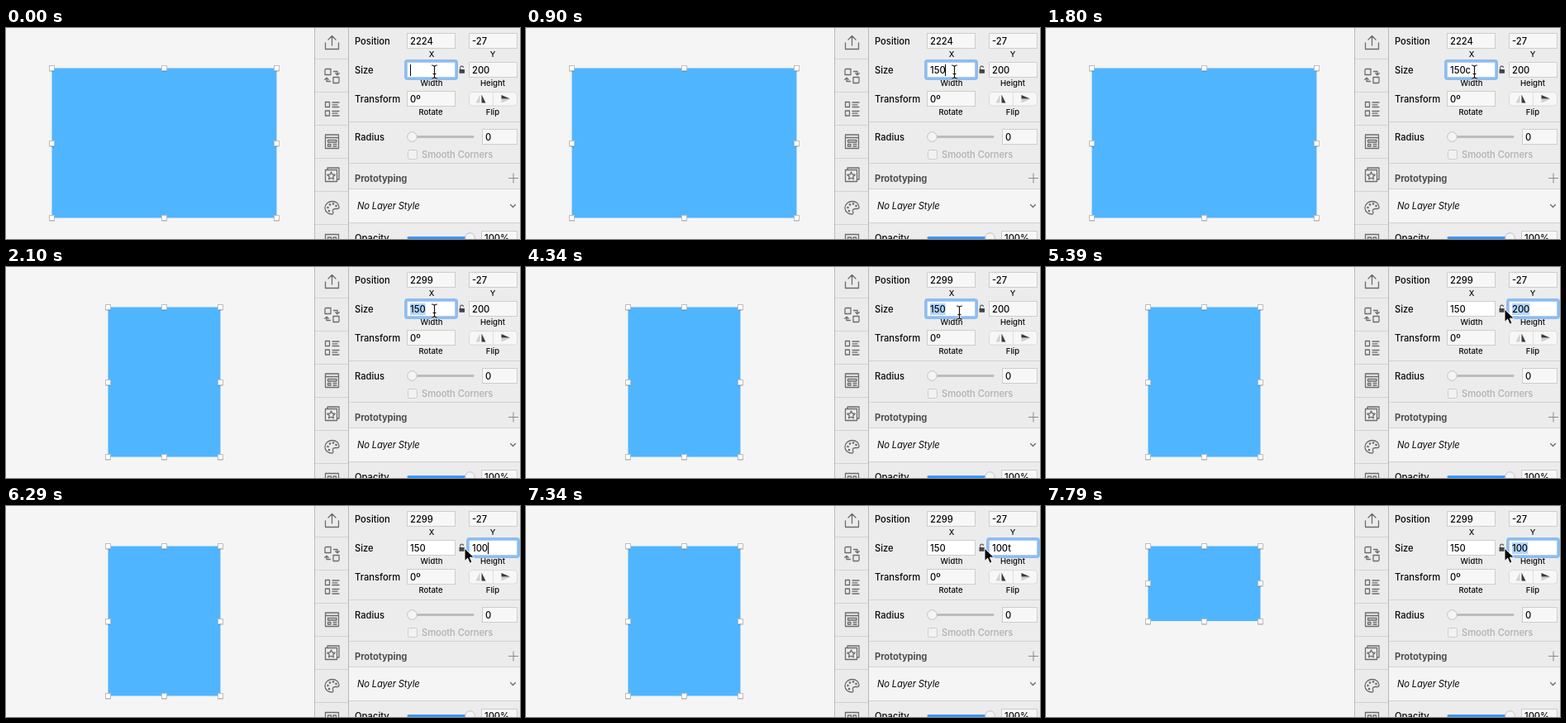
An HTML page for the animation above (8000 ms loop, 622 px wide and 255 px high).

```html
<!DOCTYPE html>
<html lang="en">
<head>
<meta charset="utf-8">
<title>Resizing a layer</title>
<style>
  html, body { margin: 0; width: 100%; height: 100%; overflow: hidden; background: #f5f5f5; }
  svg { display: block; width: 622px; height: 255px; }
  text { font: 450 11.2px Inter, "Open Sans", sans-serif; fill: #080808; white-space: pre; }
  .cap { font-size: 9.5px; text-anchor: middle; }
  .field { fill: #f7f7f7; stroke: #cdcdcd; }
  .icon { fill: none; stroke: #6c6c6c; stroke-width: 1.3; stroke-linejoin: round; stroke-linecap: round; }
  .rule { stroke: #d2d2d2; }
</style>
</head>
<body>
<svg viewBox="0 0 622 255">
  <rect width="622" height="255" fill="#f5f5f5"/>
  <rect id="layer" fill="#50b5ff"/>
  <g id="handles"></g>

  <!-- tool strip -->
  <rect x="373" width="42" height="255" fill="#ebebeb"/>
  <path stroke="#b9b9b9" d="M373.5 0V255M414.5 0V255"/>
  <path class="rule" d="M374 37.5h40M374 77.5h40M374 117.5h40M374 157.5h40M374 197.5h40M374 237.5h40"/>
  <g class="icon">
    <path d="M386.500 18v7.500h16v-7.500M394.500 21V10M390 14l4.500-4.500 4.500 4.500"/>
    <path d="M387 49.500h6v7h-7v-6zM396 59.500h7v6l-1 1h-6zM396.500 52.500h4.500v4M398.800 54.800l2.200 2 2.200-2M392.500 64.500h-4.500v-4M385.800 62.200l2.200-2 2.200 2"/>
    <path d="M386.500 89.500h5v6h-5zM386.500 100h5v6h-5zM395 90h8M395 92.800h6M395 95.500h8M395 100.500h8M395 103.200h6M395 106h8"/>
    <path d="M386.500 129h16v16.500h-16zM386.500 132.500h16M389.500 135.500h10.500v2.500h-10.500zM389.500 140.500h3.500v2.500h-3.500zM396 140.500h4M396 143h4"/>
    <path d="M386.500 171.500h14v14h-14zM389 171v-2h14v14h-2M393.500 174l1.400 3 3.300.4-2.400 2.200.6 3.200-2.900-1.600-2.900 1.600.6-3.200-2.400-2.200 3.300-.4z"/>
    <path d="M395 209.500c-5 0-9 3.500-9 8 0 4 3.500 7.500 8 7.500 2.500 0 2-2 1.500-3.500-.5-2 1-3 3-3h2.500c1.500 0 2-1 2-2 0-4-3.500-7-8-7z"/>
    <path d="M386.500 265v-15.500h16V265M389.500 265v-12h4v12M396 265v-12h3.500v12"/>
  </g>
  <g fill="#6c6c6c"><circle cx="389.500" cy="217" r="1.300"/><circle cx="392" cy="213.500" r="1.300"/><circle cx="396" cy="212.500" r="1.300"/><circle cx="399.500" cy="215" r="1.300"/><circle cx="391" cy="221" r="1.300"/></g>

  <!-- inspector -->
  <rect x="415" width="207" height="255" fill="#ececec"/>
  <rect x="415" y="195" width="207" height="40" fill="#f5f5f5"/>
  <path class="rule" d="M415 113.500h207M415 163.500h207M415 194.500h207M415 235.500h207"/>
  <g id="fields"></g>
  <g id="labels"></g>

  <rect x="560.500" y="77.500" width="58" height="16.500" rx="3.500" fill="#f7f7f7" stroke="#dadada"/>
  <path stroke="#dedede" d="M589.500 78v15.500"/>
  <path fill="#d0d0d0" d="M573.500 80.500v10h-5zM599.500 86h10.500l-10.500 4.500z"/>
  <path fill="#3a3a3a" d="M575.500 80.500v10h5zM599.500 85.500h10.500l-10.500-4.500z"/>

  <g stroke-linecap="round" stroke-width="3">
    <path stroke="#bcbcbc" d="M492 131.500h73"/>
    <path stroke="#3b97fa" d="M487 253.500h74"/>
  </g>
  <g fill="#f4f4f4" stroke="#c2c2c2"><circle cx="491.500" cy="131.500" r="5.800"/><circle cx="561.500" cy="253.500" r="5.800"/></g>
  <rect x="486.500" y="147.500" width="11" height="11" rx="2" fill="#f2f2f2" stroke="#cbcbcb"/>
  <path stroke="#8a8a8a" d="M608 181.500h12M614 175.500v12"/>
  <path class="icon" d="M610.500 213.500l3 3 3-3"/>
  <path fill="none" stroke="#555" stroke-width="1.100" d="M549.700 50.500v-2.500a1.900 1.900 0 0 1 3.800 0"/>
  <rect x="548.500" y="50" width="6.500" height="4.800" rx=".6" fill="#444"/>

  <!-- focused input -->
  <rect id="ring" fill="none" stroke="#8dbdf0" stroke-width="3" rx="2.500"/>
  <rect id="mark" y="44" height="14" fill="#b2d6fd"/>
  <text id="xValue" x="489" y="20"></text>
  <text id="width" x="489" y="55"></text>
  <text id="height" x="564" y="55"></text>
  <rect id="caret" y="44" width="1" height="14" fill="#000"/>

  <g id="beam" fill="none">
    <path id="beamShape" stroke="#fff" stroke-width="2.600" d="M-3.500-8q3 0 3.500 1.500Q.5-8 3.500-8M0-6.500v13M-3.500 8q3 0 3.500-1.500Q.5 8 3.500 8M-2 2.500h4"/>
    <path stroke="#111" stroke-width="1.200" d="M-3.500-8q3 0 3.500 1.500Q.5-8 3.500-8M0-6.500v13M-3.500 8q3 0 3.500-1.500Q.5 8 3.500 8M-2 2.500h4"/>
  </g>
  <path id="arrow" fill="#000" stroke="#fff" d="M0 0v15.500l3.600-3.400 2.600 6.100 2.800-1.200-2.600-5.900h5z"/>
</svg>
<script>
const LOOP = 8000;
const $ = id => document.getElementById(id);

function add(parent, tag, attrs, content) {
  const el = document.createElementNS('http://www.w3.org/2000/svg', tag);
  set(el, attrs);
  if (content) el.textContent = content;
  parent.append(el);
  return el;
}
function set(el, attrs) {
  for (const key in attrs) el.setAttribute(key, attrs[key]);
}
const show = (el, on) => set(el, { visibility: on ? 'visible' : 'hidden' });

function label(x, y, content, style = '') {
  add($('labels'), 'text', { x, y, style }, content);
}
function caption(x, y, content) {
  add($('labels'), 'text', { x, y, class: 'cap' }, content);
}
function field(x, y, width = 58) {
  return add($('fields'), 'rect', { x: x + .5, y: y + .5, width, height: 18, class: 'field' });
}

field(485, 6);
field(560, 6);
const boxes = [field(485, 41), field(560, 41)];
field(485, 76);
field(576, 122, 42);
field(575, 245, 43);

label(422, 20, 'Position');
label(422, 55, 'Size');
label(422, 90, 'Transform');
label(422, 136, 'Radius');
label(422, 258, 'Opacity');
label(564, 20, '-27');
label(489, 90, '0º');
label(580, 136, '0');
label(579, 258, '100%');
label(503, 157, 'Smooth Corners', 'fill:#b0b0b0;letter-spacing:-.08px');
label(422, 186, 'Prototyping', 'font-weight:700;fill:#505050;letter-spacing:-.1px');
label(425, 219, 'No Layer Style', 'font-style:italic;letter-spacing:-.15px');
caption(515, 35, 'X');
caption(589, 35, 'Y');
caption(515, 70, 'Width');
caption(589, 70, 'Height');
caption(514, 105, 'Rotate');
caption(589, 105, 'Flip');

// each handle is a white square over a soft shadow
const handles = Array.from({ length: 8 }, () => {
  const g = add($('handles'), 'g', {});
  add(g, 'rect', { x: -3.5, y: -3, width: 7, height: 7.5, rx: 1, fill: '#000', opacity: .15 });
  add(g, 'rect', { x: -3, y: -3, width: 6, height: 6, fill: '#fff', stroke: '#bdbdbd' });
  return g;
});

// [start, value]: the latest entry reached is in force
const widthText = [[0, ''], [450, '1'], [750, '15'], [900, '150'], [1350, '150c'], [2100, '150']];
const heightText = [[0, '200'], [5840, '1'], [6140, '10'], [6290, '100'], [6740, '100t'], [7790, '100']];
const editing = [[0, 'caret'], [1800, ''], [2100, 'mark'], [5840, 'caret'], [7340, ''], [7790, 'mark']];
const ringGrow = [[0, 0], [5090, null], [5240, 2.5], [5390, 0]];
const pointer = [
  [0, ['beam', 518.5, 53]], [4340, ['beam', 524.5, 55]],
  [4490, ['arrow', 552, 57]], [4640, ['arrow', 560.5, 56]],
  [4790, ['beam', 578, 53]], [4940, ['beam', 585.5, 53]],
  [5240, ['arrow', 562, 47.5]], [5390, ['arrow', 555, 51]]
];
const at = (track, t) => track.findLast(([start]) => t >= start)[1];

function drawLayer(t) {
  const x = t < 2100 ? 55.5 : 123.5;
  const y = 48.5;
  const width = t < 2100 ? 272 : 136;
  const height = t < 7790 ? 181 : 90.5;
  set($('layer'), { x, y, width, height });
  let i = 0;
  for (const u of [0, .5, 1]) for (const v of [0, .5, 1]) {
    if (u === .5 && v === .5) continue;
    const hy = Math.floor(y + v * height) + .5;
    set(handles[i++], { transform: `translate(${x + u * width} ${hy})` });
  }
}

function drawInput(t) {
  const second = t >= 5090;
  const box = second ? 560 : 485;
  const grow = at(ringGrow, t);
  boxes.forEach((el, i) => {
    el.style.fill = i <= +second ? '#fff' : '';
    el.style.stroke = i === +second && grow !== null ? '#a9cbf1' : '';
  });
  $('xValue').textContent = t < 2100 ? '2224' : '2299';
  $('width').textContent = at(widthText, t);
  $('height').textContent = at(heightText, t);

  show($('ring'), grow !== null);
  if (grow !== null) {
    set($('ring'), { x: box - 1.5 - grow, y: 39.5 - grow, width: 62 + 2 * grow, height: 22 + 2 * grow });
  }
  const start = second ? 564 : 489;
  const value = $(second ? 'height' : 'width');
  const length = value.textContent ? value.getComputedTextLength() : 0;
  const mode = at(editing, t);
  show($('mark'), mode === 'mark');
  show($('caret'), mode === 'caret');
  set($('mark'), { x: start, width: length });
  set($('caret'), { x: Math.floor(start + length) });
}

function drawPointer(t) {
  const [kind, x, y] = at(pointer, t);
  for (const id of ['beam', 'arrow']) show($(id), id === kind);
  set($(kind), { transform: `translate(${x} ${y})` });
}

function draw(t) {
  drawLayer(t);
  drawInput(t);
  drawPointer(t);
}

const origin = performance.now();
function tick() {
  draw((performance.now() - origin) % LOOP);
  requestAnimationFrame(tick);
}
draw(0);
requestAnimationFrame(tick);
</script>
</body>
</html>
```
